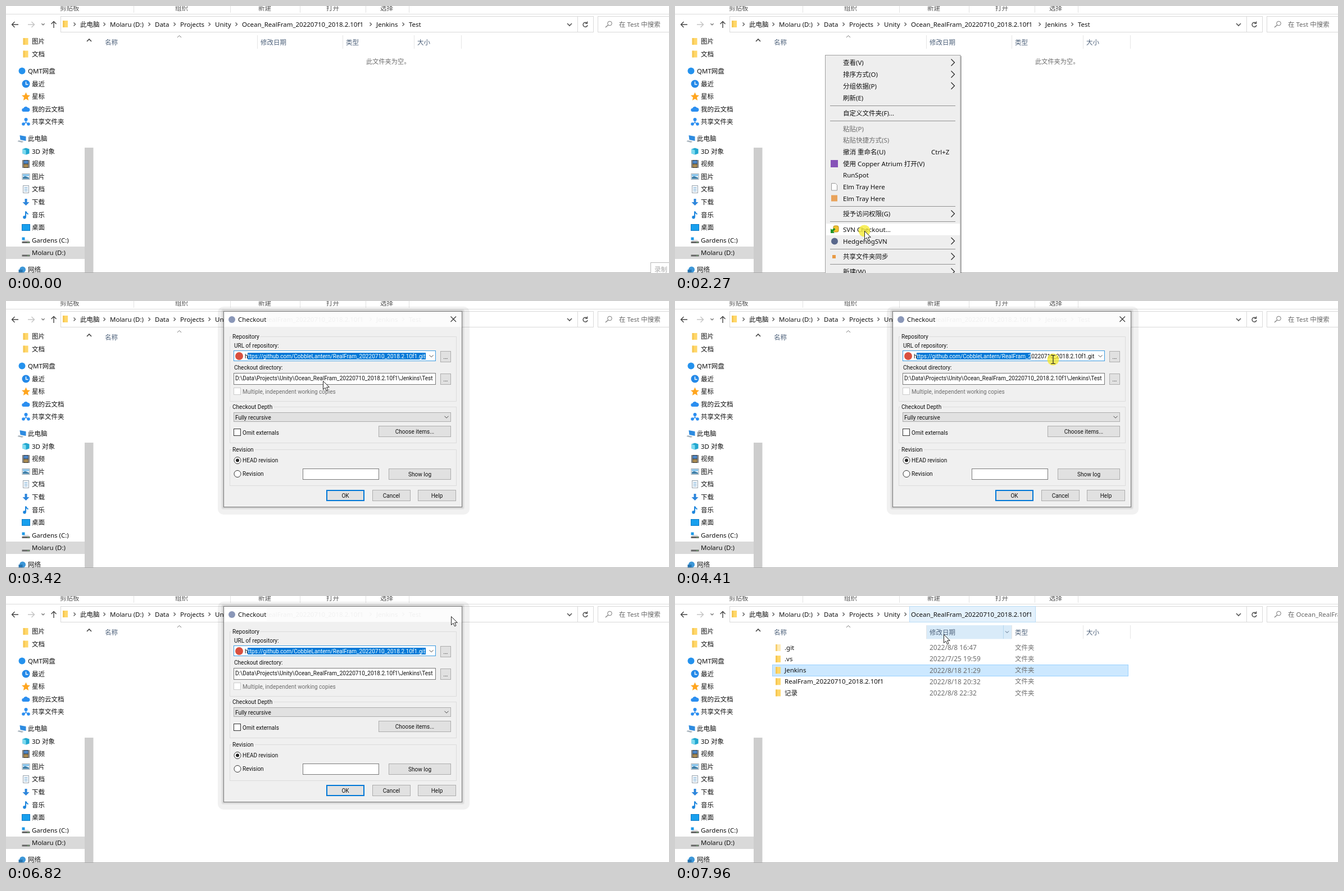
An HTML page that plays this animation: 1180 px wide and 475 px high, repeating every 8000 ms.

```html
<!DOCTYPE html>
<html lang="zh-CN">
<head>
<meta charset="utf-8">
<title>Checkout</title>
<style>
  html, body { margin: 0; width: 100%; height: 100%; overflow: hidden; background: #fff; }
  svg { display: block; }
  text { font-family: "Noto Sans", "Noto Sans CJK SC", "Noto Sans CJK", sans-serif; white-space: pre; }
  #dialog text { font-family: Roboto, "Noto Sans", sans-serif; }
  #dialog text.title { font-family: "Noto Sans", sans-serif; }
  .label { paint-order: stroke; stroke: #f0f0f0; stroke-width: 5px; }
</style>
</head>
<body>
<svg id="stage" width="1180" height="475" viewBox="0 0 1180 475"></svg>
<script>
const LOOP = 8000, STEP = 126.2;
const GREY = '#6d6d6d', HEAD = '#4c607a';

// Text is placed by its vertical centre.
const text = (x, y, s, fill = '#111', size = 11.5, more = '') =>
  `<text x="${x}" y="${y + size * 0.36}" font-size="${size}" fill="${fill}" ${more}>${s}</text>`;
const rect = (x, y, w, h, fill, stroke = 'none', more = '') =>
  `<rect x="${x}" y="${y}" width="${w}" height="${h}" fill="${fill}" stroke="${stroke}" ${more}/>`;
const disc = (x, y, r, fill, stroke = 'none') =>
  `<circle cx="${x}" cy="${y}" r="${r}" fill="${fill}" stroke="${stroke}"/>`;
const line = (d, stroke = '#555', w = 1) =>
  `<path d="${d}" fill="none" stroke="${stroke}" stroke-width="${w}"/>`;
const shape = (d, fill) => `<path d="${d}" fill="${fill}"/>`;
const group = (id, body) => `<g id="${id}">${body}</g>`;
const right = (x, y, r, c, w) => line(`M${x - r / 2} ${y - r}l${r} ${r}l${-r} ${r}`, c, w);
const down = (x, y, r, c, w) => line(`M${x - r} ${y - r / 2}l${r} ${r}l${r} ${-r}`, c, w);
const folder = (x, y, c = '#ffd769') =>
  rect(x, y - 6, 9, 12, c) + rect(x, y - 6, 3, 12, '#f0bd45', 'none', 'opacity=".6"');

// Sidebar icons, drawn around 0,0
const cloud = shape('M-4 4.5a3 3 0 0 1-.5-6a4.5 4.5 0 0 1 8-1a3.6 3.6 0 0 1 1 7z', '#2b8ef0');
const drive = shape('M-7 1.5l4-3H4l3 3z', '#dcdcdc') + rect(-7, 1.5, 14, 3, '#666') + rect(3, 2.5, 2, 1, '#6fe06f');
const icons = {
  folder: folder(-5, 0),
  brand: disc(0, 0, 6, '#2492ee'),
  clock: disc(0, 0, 7, '#2489e8') + line('M0-4V1H4', '#fff', 1.4),
  star: shape('M0-7.5L2.2-2.6 7.5-2 3.5 1.6 4.6 7 0 4.2-4.6 7-3.5 1.6-7.5-2-2.2-2.6z', '#ffa51e'),
  cloud,
  share: line('M0-4V1L-4 4M0 1L4 4', '#2b8ef0', 1.5) + disc(0, -4, 3, '#2b8ef0') + disc(-4.5, 4, 2.8, '#2b8ef0') + disc(4.5, 4, 2.8, '#2b8ef0'),
  pc: shape('M-4-6L7-4V4L-3 2z', '#2d8be0') + shape('M-6 3l9 2-3 2-8-2z', '#a9b4bd'),
  cube: shape('M-6-4L0-6 6-4V4L0 6-6 4z', '#22a7cf') + shape('M-6-4L0-2V6L-6 4z', '#7fdbf0'),
  film: rect(-6.5, -7, 13, 14, '#333') + rect(-4, -6, 8, 5.5, '#4d86c6') + rect(-4, .5, 8, 5.5, '#a98a50') + line('M-5.3-7V7M5.3-7V7', '#ddd', 1),
  picture: rect(-6.5, -5, 13, 10, '#eef6fc', '#9aa5ad') + shape('M-5.5 4V1l4-2 7 3v2z', '#3f7fa8') + rect(-5.5, -4, 11, 3, '#7fc2ee'),
  doc: rect(-5, -6.5, 10, 13, '#fff', '#98a4ae') + line('M-3-3H3M-3 0H3M-3 3H3', '#5c9bcb', 1.2),
  download: shape('M-2-6H2V0H6L0 6-6 0H-2z', '#2d86dc'),
  music: line('M-.5 4V-6Q1-3 4-1', '#1f86dd', 2) + disc(-2.5, 4.3, 2.8, '#1f86dd'),
  desktop: rect(-7, -5.5, 14, 11, '#18a0ee', '#0a78c4'),
  system: `<g transform="translate(0 1)">${drive}</g>` + rect(-7, -5, 5, 5, '#1e9ae8'),
  drive: `<g transform="translate(0 2)">${drive}</g>`,
  net: disc(1, 0, 5.5, '#3d97d8') + rect(-6, 0, 7, 5, '#2673ae')
};
const tree = [
  [63, 1, 'folder', '图片'], [85.5, 1, 'folder', '文档'], [115.5, 0, 'brand', 'QMT网盘'],
  [138.5, 1, 'clock', '最近'], [161, 1, 'star', '星标'], [183.5, 1, 'cloud', '我的云文档'],
  [206, 1, 'share', '共享文件夹'], [236, 0, 'pc', '此电脑'], [258.5, 1, 'cube', '3D 对象'],
  [281, 1, 'film', '视频'], [303.5, 1, 'picture', '图片'], [326, 1, 'doc', '文档'],
  [349, 1, 'download', '下载'], [371.5, 1, 'music', '音乐'], [394, 1, 'desktop', '桌面'],
  [416.5, 1, 'system', 'Gardens (C:)'], [439, 1, 'drive', 'Molaru (D:)'], [469, 0, 'net', '网络']
];

const crumb = ([x, s]) => text(x, 32.5, s) + right(x - 10, 32.5, 3, '#555', 1.3);
const crumbs = [[132, '此电脑'], [185, 'Molaru (D:)'], [265, 'Data'], [310, 'Projects'],
  [372, 'Unity'], [420, 'Ocean_RealFram_20220710_2018.2.10f1']];

function explorer() {
  const ribbon = [[96, '剪贴板'], [301, '组织'], [449, '新建'], [570, '打开'], [666, '选择']];
  return rect(0, 0, 1180, 475, '#fff') +
    ribbon.map(([x, s]) => text(x, 4, s, '#555')).join('') +
    line('M227.5 0V12M399.5 0V12M523.5 0V12M640.5 0V12M717.5 0V12', '#e2e2e2') +
    line('M0 14.5H1180', '#dcdcdc') +
    rect(97.5, 18.5, 948, 28, '#fff', '#d9d9d9') + line('M1017.5 19V46', '#d9d9d9') +
    rect(1053.5, 18.5, 140, 28, '#fff', '#d9d9d9') +
    line('M22 33H11M15.5 28L10.5 33L15.5 38', '#444', 1.4) +
    line('M39 33H50M45.5 28L50.5 33L45.5 38', '#c4c4c4', 1.4) +
    down(66, 32.5, 2.6, '#777', 1.3) + line('M85 39V28M80.5 32L85 27.5L89.5 32', '#444', 1.4) +
    folder(101, 32) + down(1003, 33, 4, '#555', 1.6) +
    line('M1034 30.5a4 4 0 1 0 1 3.5M1034.5 27.5V31H1031', '#555', 1.5) +
    `<circle cx="1074.5" cy="31" r="3.8" fill="none" stroke="#777"/>` + line('M1071.5 34L1067 38', '#777', 1.2) +
    group('crumbHover', rect(417.5, 18.5, 224, 28, '#e3f1fc', '#b9dcf6')) +
    crumbs.map(crumb).join('') +
    group('deepPath', crumb([659, 'Jenkins']) + crumb([717, 'Test']) + text(1091, 32.5, '在 Test 中搜索', '#666')) +
    group('upPath', text(1091, 32.5, '在 Ocean_RealFram_20220710_2018.2.10f1 中搜索', '#666')) +
    rect(0, 428, 140, 22, '#d9d9d9') + rect(140, 252, 15.5, 223, '#cdcdcd') +
    line('M144 63l4-4l4 4', '#444', 1.6) +
    tree.map(([y, deep, icon, s]) =>
      `<g transform="translate(${deep ? 35.5 : 28.5} ${y})">${icons[icon]}</g>` + text(deep ? 46 : 39, y, s)).join('') +
    group('colHover', rect(447, 52, 152, 24.5, '#d9ebf9') + line('M584.5 52V76', '#b5d7ef') + down(591, 64, 3, HEAD)) +
    line('M447.5 52V76M599.5 52V76M726.5 52V76M810.5 52V76', '#e5e5e5') + line('M305 56l3.5-3.5l3.5 3.5', '#777') +
    [[176, '名称'], [453, '修改日期'], [605, '类型'], [732, '大小']].map(([x, s]) => text(x, 64.5, s, HEAD)).join('') +
    group('empty', text(641, 98.5, '此文件夹为空。', GREY, 11.2)) + group('files', fileList()) +
    line('M0 474.5H1180', '#aaa') +
    group('recorder', rect(1147.5, 456.5, 40, 30, '#fff', '#b8b8b8') + text(1154, 469, '录制', '#aaa'));
}

function fileList() {
  const rows = [['.git', '2022/8/8 16:47'], ['.vs', '2022/7/25 19:59'], ['Jenkins', '2022/8/18 21:29'],
    ['RealFram_20220710_2018.2.10f1', '2022/8/18 20:32'], ['记录', '2022/8/8 22:32']];
  return rect(173.5, 122.5, 633, 20, '#cce8ff', '#99d1ff') + rows.map(([name, date], i) => {
    const y = 92 + i * 20.1;
    return folder(179, y, i ? undefined : '#ffebb5') + text(195, y, name) +
      text(453, y, date, GREY, 12) + text(605, y, '文件夹', GREY);
  }).join('');
}

const items = [
  [101, '查看(V)', 1], [122, '排序方式(O)', 1], [142.5, '分组依据(P)', 1], [163.5, '刷新(E)'],
  [191, '自定义文件夹(F)...'], [218.5, '粘贴(P)'], [239, '粘贴快捷方式(S)'], [260, '撤消 重命名(U)'],
  [280.5, '使用 Copper Atrium 打开(V)'], [301, 'RunSpot'], [321.5, 'Elm Tray Here'], [342.5, 'Elm Tray Here'],
  [370, '授予访问权限(G)', 1], [397.5, 'SVN Checkout...'], [418.5, 'HedgehogSVN', 1],
  [446, '共享文件夹同步', 1], [473, '新建(W)', 1]
];

function menu() {
  return rect(269, 89, 241, 400, '#000', 'none', 'opacity=".3"') +
    rect(267.5, 87.5, 240.5, 400, '#eee', '#a0a0a0') +
    rect(269, 0, 238, 20.6, '#fff', 'none', 'id="hover"') +
    [177.5, 204.5, 356.5, 383.5, 432.5, 459.5].map(y => line(`M276 ${y}H499`, '#929292')).join('') +
    items.map(([y, s, sub]) => text(299, y, s, s[0] === '粘' ? GREY : '#111') +
      (sub ? right(494.5, y - .5, 6, '#222', 1.2) : '')).join('') +
    text(456, 260, 'Ctrl+Z') + rect(277, 274, 13, 13, '#8653b8') +
    shape('M279 315.5h7l3 3v9.5h-10z', '#fff') + line('M278.5 315.5h7l3 3v9.5h-10z', '#999') +
    rect(278, 336.5, 11, 11, '#e9a35b') +
    rect(282, 391, 9, 11, '#f2c230', '#b48a10', 'rx="2.5"') +
    shape('M277 404v-8l2.5 2 4-3 2 2.5-4 3.5 2.5 3z', '#21952a') +
    disc(284, 418.5, 6, '#59688c') + rect(280, 443, 6, 6, '#e89a45');
}

const URL_TEXT = 'https://github.com/CobbleLantern/RealFram_20220710_2018.2.10f1.git';
function dialog() {
  const t = (x, y, s, c = '#111', more) => text(x, y, s, c, 10.05, more);
  const frame = (y, h, s) => rect(398.5, y + .5, 403, h, 'none', '#dcdcdc') + t(403, y, s, '#111', 'class="label"');
  const button = (x, y, w, h, s) => rect(x + .5, y + .5, w, h, '#e1e1e1', '#adadad') +
    t(x + w / 2 + .5, y + h / 2 + .5, s, '#111', 'text-anchor="middle"');
  const box = (y, c) => rect(405.5, y - .5, 12, 12, '#fff', c);
  const shadow = (grow, o) =>
    rect(387 - grow, 18 - grow, 425 + 2 * grow, 349 + 2 * grow, '#000', 'none', `rx="${grow}" opacity="${o}"`);
  return rect(377, 10, 448, 370, '#000', 'none', 'rx="10" opacity=".055"') + shadow(4, .05) + shadow(2, .08) +
    rect(387.5, 46, 424, 320.5, '#f0f0f0') +
    rect(387.5, 18.5, 424, 27.5, '#fff', 'none', 'opacity=".94"') + rect(390, 22, 74, 22, '#fff') +
    rect(387.5, 18.5, 424, 348, 'none', '#787878') +
    disc(402, 33, 6, '#8a97b8') + text(413, 32.5, 'Checkout', '#111', 11.4, 'class="title"') +
    group('close', line('M791.5 27.5l9.5 9.5M801 27.5l-9.5 9.5', '#333', 1.1)) +
    frame(63, 115, 'Repository') + frame(188, 64, 'Checkout Depth') + frame(264, 64, 'Revision') +
    t(406, 79.5, 'URL of repository:') + rect(405.5, 88.5, 359, 18, '#fff', '#3c9be0') +
    disc(415, 98, 7, '#d9503f') + t(425, 98.5, URL_TEXT) +
    `<clipPath id="sel"><rect id="selBox" x="430" y="92" width="317" height="12"/></clipPath>` +
    `<g clip-path="url(#sel)">${rect(430, 92, 317, 12, '#0078d7')}${t(425, 98.5, URL_TEXT, '#fff')}</g>` +
    group('caret', line('M746.5 92V104', '#111')) + down(757, 98, 3.5, '#444') +
    button(773, 89, 18, 19, '...') + t(406, 118.5, 'Checkout directory:') +
    rect(405.5, 128.5, 359, 20, '#fff', '#7a7a7a') +
    t(408, 137.5, 'D:\\Data\\Projects\\Unity\\Ocean_RealFram_20220710_2018.2.10f1\\Jenkins\\Test') +
    button(773, 129, 18, 19, '...') +
    box(155, '#ccc') + t(421, 161.5, 'Multiple, independent working copies', GREY) +
    rect(405.5, 198.5, 386, 16, '#e1e1e1', '#adadad') + t(408, 207, 'Fully recursive') + down(784, 206.5, 3.5, '#444') +
    box(228, '#333') + t(421, 234, 'Omit externals') + button(663, 222, 128, 19, 'Choose items...') +
    disc(412, 283.5, 6, '#fff', '#333') + disc(412, 283.5, 3, '#222') + t(421, 283.5, 'HEAD revision') +
    disc(412, 307.5, 6, '#fff', '#333') + t(421, 307.5, 'Revision') +
    rect(528.5, 298.5, 135, 19, '#fff', '#7a7a7a') + button(681, 298, 110, 19, 'Show log') +
    button(570, 336, 67, 19, 'OK') + rect(571, 337, 66, 18, 'none', '#0078d7', 'stroke-width="2"') +
    button(652, 336, 67, 19, 'Cancel') + button(733, 336, 67, 19, 'Help');
}

const $ = id => document.getElementById(id);
$('stage').innerHTML = explorer() + group('menu', menu()) + group('dialog', dialog()) +
  group('pointer', `<circle id="press" r="10.5" fill="#f5ea2a" opacity=".75"/>` +
    group('beam', line('M-4-7.5H-1L0-6.5L1-7.5H4M0-6.5V6.5M-4 7.5H-1L0 6.5L1 7.5H4', '#222', 1.2)) +
    group('arrow', '<path d="M.5.5V15.5L4 12.2L6.5 17.8L9 16.7L6.6 11.3H11.3Z" fill="#fff" stroke="#222"/>'));

// Pointer path: step, x, y
const path = [[1, 267, 87], [3, 268, 90], [6, 286, 166], [7, 300, 272], [14, 337, 405], [16, 337, 405],
  [17, 337, 400], [20, 337, 400], [23, 564, 174], [25, 572, 170], [28, 560, 128], [30, 430, 99], [31, 430, 99],
  [35, 673, 104], [36, 765, 112], [37, 898, 200], [38, 860, 330], [39, 700, 400], [40, 590, 408], [41, 590, 407],
  [42, 610, 350], [43, 650, 300], [44, 594, 365], [48, 594, 365], [53, 780, 60], [54, 792, 36], [56, 796, 34],
  [61, 500, 36], [62, 490, 38], [63, 478, 68]];
// Dialog visibility: step, opacity
const fade = [[22, 0], [23, .32], [24, .8], [25, 1], [55, 1], [56, .75], [57, .4], [58, 0]];

function at(keys, s) {
  const i = keys.findIndex(k => k[0] > s);
  if (i < 0) return keys[keys.length - 1].slice(1);
  if (i === 0) return keys[0].slice(1);
  const a = keys[i - 1], b = keys[i], p = (s - a[0]) / (b[0] - a[0]);
  return a.slice(1).map((v, j) => v + (b[j + 1] - v) * p);
}
const show = (id, on) => $(id).style.display = on ? '' : 'none';
const within = (s, a, b) => s >= a && s <= b;

function draw(t) {
  const s = Math.floor((t + 20) / STEP);
  const [x, y] = at(path, s), [o] = at(fade, s), up = s >= 62;

  show('recorder', s === 0);
  show('deepPath', !up);
  show('upPath', up);
  show('empty', !up);
  show('files', up);
  show('colHover', s === 63);
  show('crumbHover', s >= 60);

  show('menu', within(s, 2, 19));
  const row = items.find(it => Math.abs(it[0] - y) <= 10.4);
  show('hover', row);
  if (row) $('hover').setAttribute('y', row[0] - 10.3);

  show('dialog', o > 0);
  const scale = .95 + .05 * o;
  $('dialog').setAttribute('opacity', o);
  $('dialog').setAttribute('transform', `translate(599.5 192.5) scale(${scale}) translate(-599.5 -192.5)`);
  show('close', s < 50);
  // While dragging, the selection lags behind the pointer
  const drag = within(s, 30, 40);
  const end = drag ? Math.min(747, Math.max(430, x - 40)) : 747;
  $('selBox').setAttribute('width', end - 430);
  show('caret', s === 46);

  show('pointer', s > 0);
  $('pointer').setAttribute('transform', `translate(${x} ${y})`);
  show('beam', drag);
  show('arrow', !drag);
  show('press', within(s, 18, 19) || within(s, 31, 40) || [47, 55, 62].includes(s));
}

const start = performance.now();
function tick(now) {
  draw(Math.max(0, now - start) % LOOP);
  requestAnimationFrame(tick);
}
draw(0);
requestAnimationFrame(tick);
</script>
</body>
</html>
```
